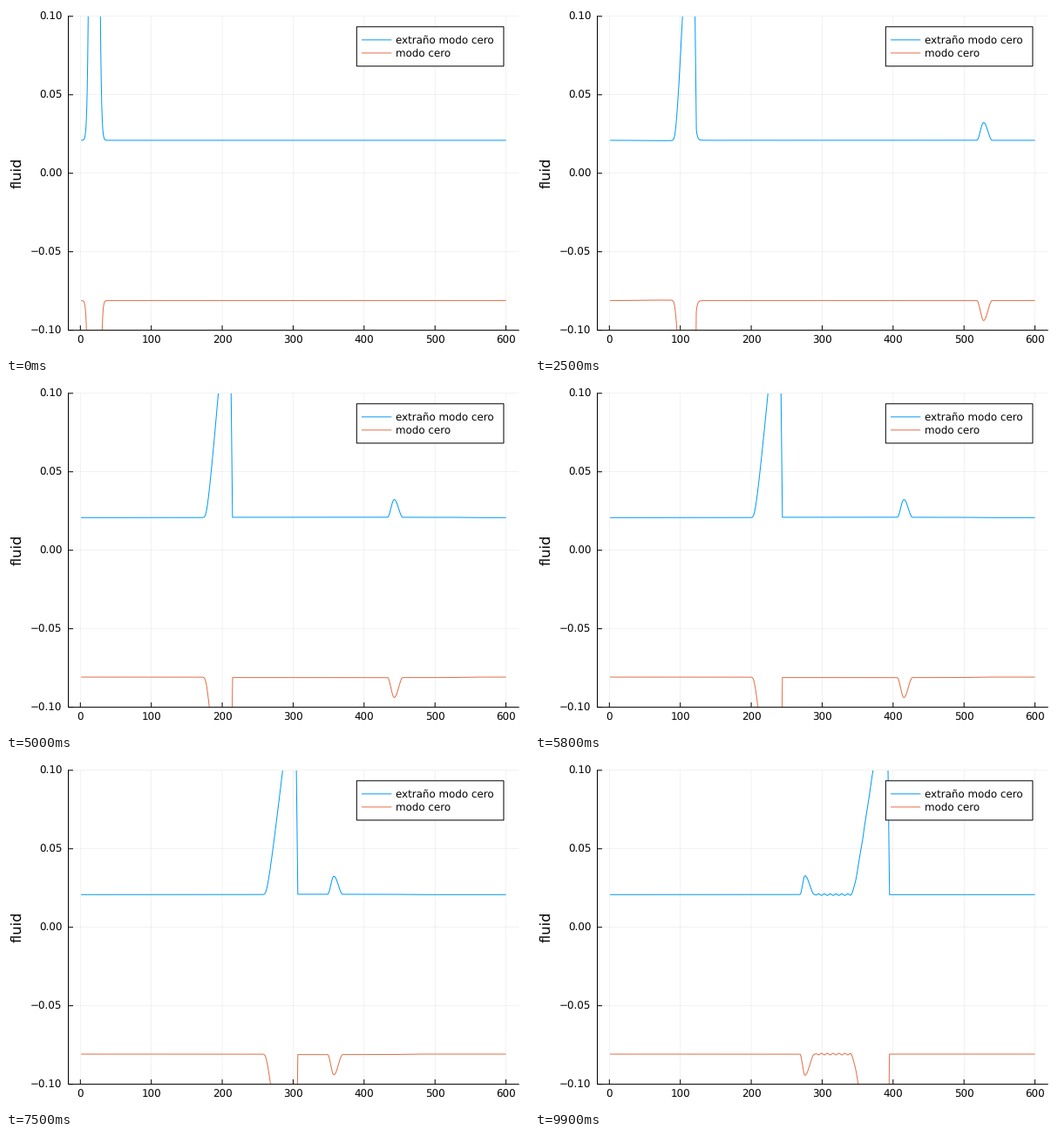
Animation, 600 px wide and 400 px high, one loop 10000 ms. Source, as a matplotlib script:

```python
import numpy as np
import matplotlib.pyplot as plt
from matplotlib.animation import FuncAnimation
from matplotlib.patches import Rectangle

PT = 0.72  # points per pixel at 100 dpi
FRAMES, STEP = 100, 100
LEFT, RIGHT, TOP, BOTTOM = 71.5, 588.19, 11.81, 371.6
SCALE = (RIGHT - LEFT) / 634.94
SPAN = 600 * SCALE
BLUE, RED = "#009afa", "#e36f47"
CENTER, VAR = 101.3, 19.0

plt.rcParams["font.family"] = "DejaVu Sans"
plt.rcParams["text.hinting"] = "none"
plt.rcParams["path.snap"] = False
fig = plt.figure(figsize=(6, 4), dpi=100, facecolor="white")
ax = fig.add_axes([0, 0, 1, 1])
ax.set(xlim=(0, 600), ylim=(400, 0))
ax.axis("off")


def px(x):
    return LEFT + (x + 16.97) * SCALE


def py(y):
    return TOP + (0.1 - y) * (BOTTOM - TOP) / 0.2


def line(x, y, color="black", width=1.0, **kw):
    kw.setdefault("solid_capstyle", "butt")
    return ax.plot(x, y, color=color, lw=width * PT, **kw)[0]


def label(x, y, text, size=11.9, **kw):
    ax.text(x, y, text, fontsize=size * PT, va="baseline", **kw)


def draw_frame():
    for v in range(0, 601, 100):
        x = px(v)
        line([x, x], [TOP, BOTTOM], width=0.5, alpha=0.1, zorder=1)
        line([x, x], [BOTTOM, BOTTOM - 5.5], zorder=4)
        label(x, 387, str(v), ha="center")
    for v in (0.1, 0.05, 0, -0.05, -0.1):
        y = py(v)
        line([LEFT, RIGHT], [y, y], width=0.5, alpha=0.1, zorder=1)
        line([LEFT, LEFT + 5.5], [y, y], zorder=4)
        label(64.3, y + 4.4, f"{v:.2f}".replace("-", "\u2212"), ha="right")
    line([LEFT, LEFT, RIGHT], [TOP, BOTTOM, BOTTOM], zorder=4,
         solid_capstyle="projecting")
    label(16.9, 191.5, "fluid", 16.3, ha="center", rotation=90,
          rotation_mode="anchor")

    top, row = 23.8, 15.05
    ax.add_patch(Rectangle((402.3, top), 168.67, 3 * row, fc="white",
                           ec="black", lw=PT, zorder=6))
    for i, (color, text) in enumerate(((BLUE, "extraño modo cero"),
                                       (RED, "modo cero")), 1):
        y = top + i * row
        line([408, 442.3], [y, y], color, zorder=7)
        label(447.3, y + 4.4, text, zorder=7)


def ramp(x, start, width):
    return np.clip((x - start) / width, 0, 1)


def pulse(t, amp, front):
    """Steepening pulse: characteristics behind, a shock in front."""
    h = np.linspace(0, 1, 400) ** 3 * 0.3 + 1e-7
    r = np.sqrt(VAR * np.log(amp / h))
    speed = 27.65 + (30.6 - 0.55 * t) * h
    back = CENTER - r + speed * t
    shock = min(1, 0.4 * t)
    ahead = front + ((1 - shock) * (CENTER + r - 108.5)
                     + shock * 1.6 * (1 - h / 0.079))
    back = np.minimum(back, ahead[-1])
    return np.interp(X, np.r_[back, ahead[::-1]], np.r_[h, h[::-1]],
                     left=0, right=0)


def bump(t, peak):
    age = ramp(t, 6.6, 3.3)
    d = X - peak
    d = np.where(d > SPAN / 2, d - SPAN, d)
    width = np.where(d < 0, 7.8 - 2 * age, 10 + 1.2 * age)
    shape = np.cos(np.pi / 2 * np.clip(d / width, -1, 1)) ** 2
    return shape * (1 + 0.06 * age) * min(1, t / 0.3)


def fields(t):
    front = 108.5 + 29.95 * t
    peak = 583.9 - 27.7 * t
    small = bump(t, peak)

    edge = peak + 10 + 1.2 * ramp(t, 6.6, 3.3)
    ripple = -np.cos(2 * np.pi * (X - edge - 1) / 6.7)
    ripple *= 0.0005 * ramp(X, edge, 3) * (X < front)

    fade = np.clip(min(t / 2.5, (3.6 - t) / 1.1), 0, 1)
    ahead = np.maximum(X - front - 1, 0)
    tail = 0.012 * fade * np.exp(-ahead / 1.3) * (X > front)

    behind = ramp(X, 95 - 28 * (t - 2.5), 40) * (X < front)
    drop = np.maximum(behind, ramp(X, peak + 65, 30))

    blue = 0.0210 - 0.0002 * drop + 0.0113 * small + ripple
    red = -0.0811 + 0.0003 * drop - 0.0127 * small - ripple
    return (blue + pulse(t, 1.04, front) + tail,
            red - pulse(t, 1.35, front) - tail)


X = np.linspace(px(1), px(600), 4880)
draw_frame()
view = Rectangle((LEFT, TOP), RIGHT - LEFT, BOTTOM - TOP,
                 transform=ax.transData)
curves = [line([], [], c, zorder=3) for c in (BLUE, RED)]
for c in curves:
    c.set_clip_path(view)


def update(i):
    for curve, y in zip(curves, fields(i * STEP / 1000)):
        curve.set_data(X, py(y))
    return curves


anim = FuncAnimation(fig, update, frames=FRAMES, interval=STEP, repeat=True,
                     repeat_delay=0, blit=False)
plt.show()
```
